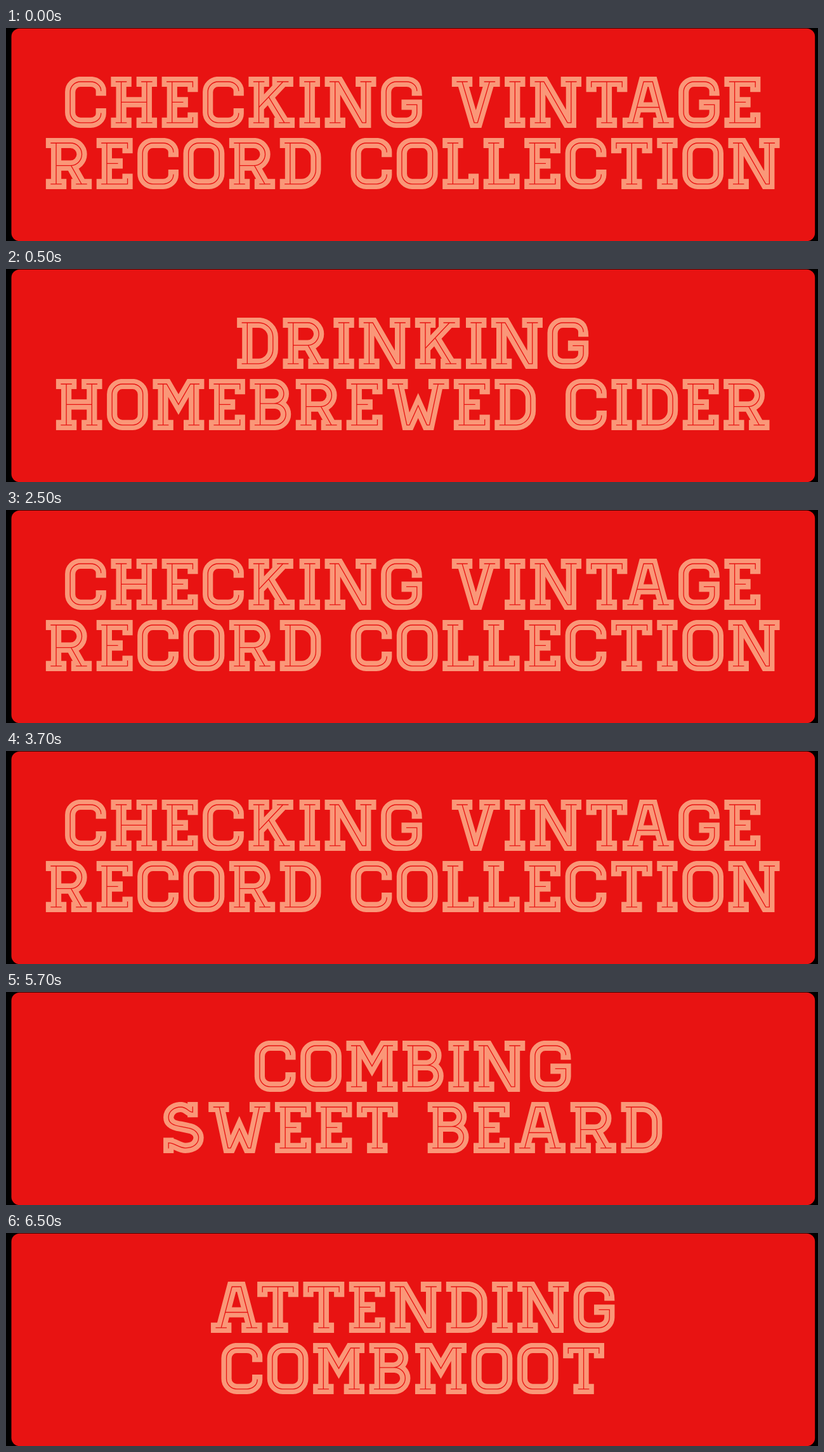
An HTML page with a canvas that plays this animation: 1280x337 px, repeating every 8000 ms.

```html
<!DOCTYPE html>
<html lang="en">
<head>
<meta charset="utf-8">
<title>Slab lettering</title>
<style>
  html, body { margin: 0; width: 100%; height: 100%; overflow: hidden; background: #000; }
  canvas { display: block; }
</style>
</head>
<body>
<canvas id="stage" width="1280" height="337" role="img"></canvas>
<script>
const RED = '#e81312', PEACH = '#fa9778';
const UNIT = 8.1;            // half a stroke; capitals are 10 units tall
const GAP = 0.93, KERN = -0.92, SPACE = 5.8;
const CENTER = 641.2, TOPS = [76.9, 173.9];

// Letter: width and centre line, in units. Serifs come from the square caps.
const STEM = 'M1 1H3M2 1V9M1 9H3';
const BACK = 'M2 1V9';
const GLYPHS = {
  A: [9.95, 'M1 9H3M6.95 9H8.95M2 9L4.1 1H5.85L7.95 9M2 9L2.79 6H7.16L7.95 9'],
  B: [8, BACK + 'M1 1H4.7A1.9 1.9 0 0 1 4.7 4.8H2M2 4.8H4.9A2.1 2.1 0 0 1 4.9 9H1'],
  C: [8, 'M7 2.75A2 1.75 0 0 0 5 1H3A2 2 0 0 0 1 3V7A2 2 0 0 0 3 9H5A2 1.8 0 0 0 7 7.2'],
  D: [8, BACK + 'M1 1H4.2A2.8 2.8 0 0 1 7 3.8V6.2A2.8 2.8 0 0 1 4.2 9H1'],
  E: [7.03, BACK + 'M1 1H6.03V2M2 5H4.1M1 9H6.03V8'],
  G: [8, 'M7 2.75A2 1.75 0 0 0 5 1H3A2 2 0 0 0 1 3V7A2 2 0 0 0 3 9H5A2 2 0 0 0 7 7V5.5H5'],
  H: [8.97, STEM + 'M5.97 1H7.97M6.97 1V9M5.97 9H7.97M2 5H6.97'],
  I: [4, STEM],
  K: [8.97, STEM + 'M5.6 1H7.7M6.7 1L2 6V9M6.7 1L3.9 3.98L6.97 9M5.97 9H7.97'],
  L: [7.03, 'M1 1H3M2 1V9M1 9H6.03V8'],
  M: [10, BACK + 'M1 1H2.7L5 5L7.3 1H9M8 1V9M1 9H3M7 9H9'],
  N: [10, BACK + 'M1 1H2.7L7.3 9H8V1M7 1H9M1 9H3'],
  O: [8, 'M3 1H5A2 2 0 0 1 7 3V7A2 2 0 0 1 5 9H3A2 2 0 0 1 1 7V3A2 2 0 0 1 3 1Z'],
  R: [8.93, STEM + 'M1 1H4.8A2.2 2.2 0 0 1 4.8 5.4H2M2 5.4H4.9L6.93 9M5.93 9H7.93'],
  S: [7.85, 'M5.7 1V2M5.7 2C4.9 2 4.6 1 3.4 1C2 1 1 1.9 1 3C1 4.2 2 4.6 3.4 4.8' +
            'L4.8 5.1C6 5.3 6.85 6 6.85 7C6.85 8.2 5.8 9 4.3 9C3 9 2.2 8 1 8M1 8V9'],
  T: [8, 'M1 2V1H7V2M4 1V9M3 9H5'],
  V: [9.35, 'M1 1H3M6.35 1H8.35M2 1L4.35 9H5L7.35 1'],
  W: [12, 'M1 1H3M9 1H11M2.1 1L3.8 9H4.3L6 5.2L7.7 9H8.2L9.9 1']
};
for (const key in GLYPHS) GLYPHS[key][1] = new Path2D(GLYPHS[key][1]);

const RECORDS = ['CHECKING VINTAGE', 'RECORD COLLECTION'];
const PHRASES = [
  RECORDS,
  ['DRINKING', 'HOMEBREWED CIDER'],
  RECORDS,
  ['COMBING', 'SWEET BEARD'],
  ['ATTENDING', 'COMBMOOT']
];

const stage = document.getElementById('stage');
const ctx = stage.getContext('2d');

function layout(text) {
  const letters = [];
  let x = 0, end = 0, prev = '';
  for (const ch of text) {
    if (ch === ' ') {
      x = end + SPACE;
    } else {
      if (prev + ch === 'AT' || prev + ch === 'TA') x = end + KERN;
      const [width, path] = GLYPHS[ch];
      letters.push({ x, path });
      end = x + width;
      x = end + GAP;
    }
    prev = ch;
  }
  return { letters, width: end };
}

function stroke(path, color, width) {
  ctx.strokeStyle = color;
  ctx.lineWidth = width;
  ctx.stroke(path);
}

function drawLine(text, top) {
  const { letters, width } = layout(text);
  ctx.save();
  ctx.translate(CENTER - width * UNIT / 2, top);
  ctx.scale(UNIT, UNIT);
  ctx.beginPath();
  ctx.rect(-1, 0, width + 2, 10);   // trims diagonals flush with the cap height
  ctx.clip();
  ctx.lineCap = 'square';
  ctx.lineJoin = 'miter';
  ctx.miterLimit = 10;
  for (const { x, path } of letters) {
    ctx.save();
    ctx.translate(x, 0);
    stroke(path, PEACH, 2);
    stroke(path, RED, 0.16);
    ctx.restore();
  }
  ctx.restore();
}

function draw(phrase) {
  ctx.fillStyle = '#000';
  ctx.fillRect(0, 0, 1280, 337);
  ctx.fillStyle = RED;
  ctx.beginPath();
  ctx.roundRect(8.5, 0.7, 1266.7, 336.5, 13);
  ctx.fill();
  phrase.forEach((text, i) => drawLine(text, TOPS[i]));
  stage.setAttribute('aria-label', phrase.join(' '));
}

let shown = -1;
function tick() {
  const time = performance.now() % 8000;
  const index = Math.floor((time + 1500) / 2000);
  if (index !== shown) draw(PHRASES[shown = index]);
  requestAnimationFrame(tick);
}
tick();
</script>
</body>
</html>
```
